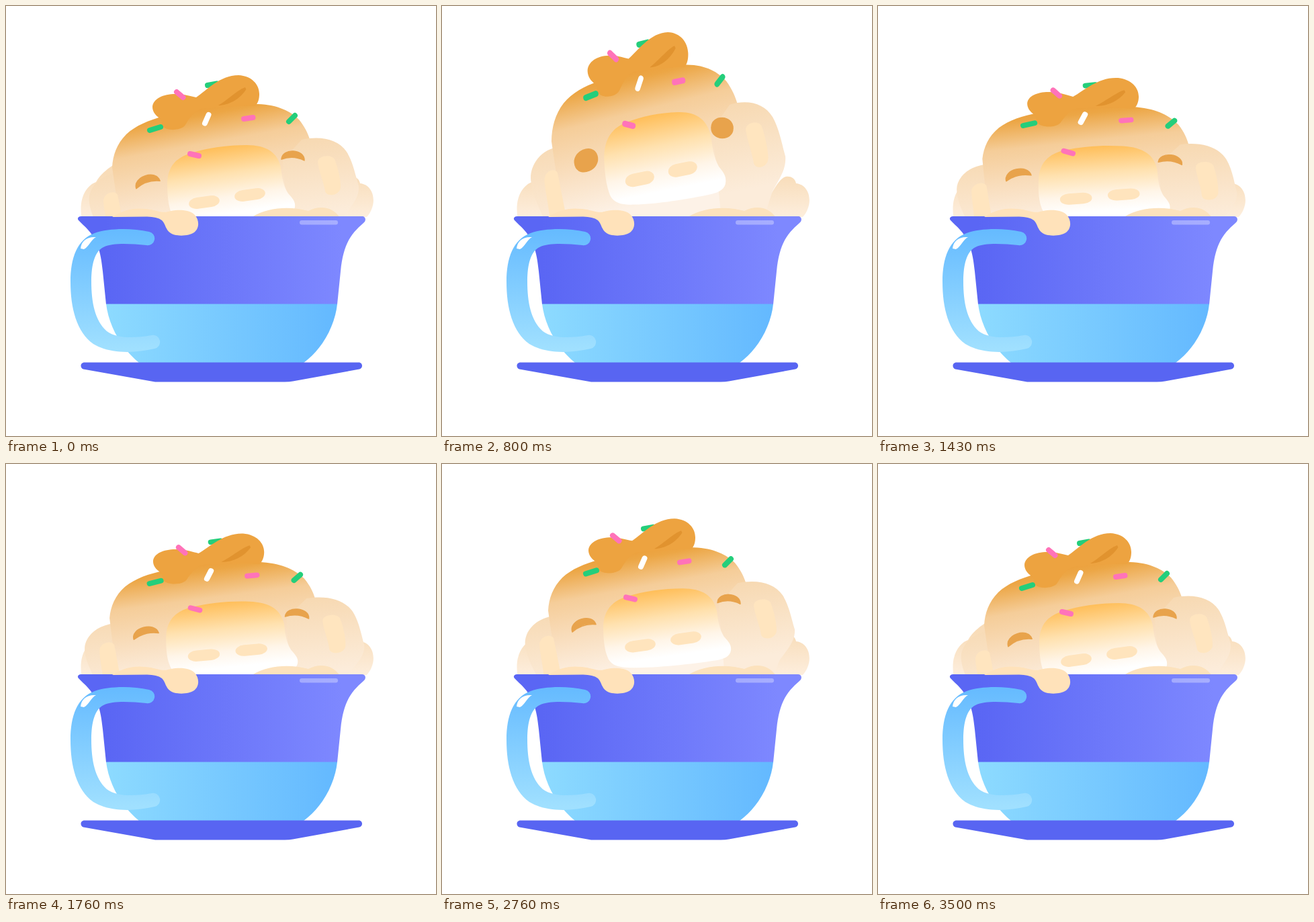
These frames come from a looping animation (640 by 640 pixels, 3530 ms). An HTML page:

```html
<!DOCTYPE html>
<html lang="en">
<head>
<meta charset="utf-8">
<title>Ice cream cup</title>
<style>
  html, body { margin: 0; width: 100%; height: 100%; overflow: hidden; background: #fff; }
  svg { display: block; width: 100vw; height: 100vh; }
  .sprinkle { stroke-width: 8; stroke-linecap: round; fill: none; }
  .green { stroke: #24ce7b; }
  .pink { stroke: #ff73b9; }
  .white { stroke: #fff; }
  .eye { fill: #e8a34c; stroke: #e8a34c; stroke-width: 1.5; stroke-linejoin: round; }
  .curl { fill: #eda340; }
  .patch { fill: #ffe5bf; }
  .saucer { fill: #5865f2; }
</style>
</head>
<body>
<svg viewBox="0 0 640 640">
  <defs>
    <linearGradient id="head" gradientUnits="userSpaceOnUse" x1="293" y1="150" x2="324" y2="322">
      <stop offset="0" stop-color="#eca03c"/>
      <stop offset=".07" stop-color="#eca645"/>
      <stop offset=".31" stop-color="#f5cd99"/>
      <stop offset=".65" stop-color="#f9dfc0"/>
      <stop offset="1" stop-color="#fdf2e7"/>
    </linearGradient>
    <linearGradient id="ear" gradientUnits="userSpaceOnUse" x1="300" y1="200" x2="318" y2="330">
      <stop offset="0" stop-color="#f6d6ac"/>
      <stop offset="1" stop-color="#fcecda"/>
    </linearGradient>
    <linearGradient id="bump" gradientUnits="userSpaceOnUse" x1="0" y1="250" x2="0" y2="314">
      <stop offset="0" stop-color="#f8dcb8"/>
      <stop offset="1" stop-color="#fdeedd"/>
    </linearGradient>
    <linearGradient id="snout" gradientUnits="userSpaceOnUse" x1="322" y1="210" x2="336" y2="308">
      <stop offset="0" stop-color="#ffbf5b"/>
      <stop offset=".4" stop-color="#ffe1ae"/>
      <stop offset=".75" stop-color="#fff5e8"/>
      <stop offset="1" stop-color="#fff"/>
    </linearGradient>
    <linearGradient id="cup" gradientUnits="userSpaceOnUse" x1="150" y1="0" x2="500" y2="0">
      <stop offset="0" stop-color="#5a66f4"/>
      <stop offset="1" stop-color="#7e88ff"/>
    </linearGradient>
    <linearGradient id="base" gradientUnits="userSpaceOnUse" x1="155" y1="0" x2="490" y2="0">
      <stop offset="0" stop-color="#8cdaff"/>
      <stop offset="1" stop-color="#64b9ff"/>
    </linearGradient>
    <linearGradient id="handle" gradientUnits="userSpaceOnUse" x1="0" y1="335" x2="0" y2="510">
      <stop offset="0" stop-color="#66bbff"/>
      <stop offset="1" stop-color="#a0e0ff"/>
    </linearGradient>
    <clipPath id="above"><rect width="640" height="314"/></clipPath>
  </defs>

  <g clip-path="url(#above)">
    <g fill="url(#bump)">
      <path d="M113 318C107 286 120 267 134 262C140 251 150 243 162 235L210 318Z"/>
      <path d="M468 318C485 290 500 256 512 254C521 253 526 258 527 264C548 266 554 295 537 314Z"/>
    </g>
    <g id="creature">
      <path fill="url(#ear)" d="M172 247C136 250 121 275 124 292C125 305 132 320 145 345L210 390V247Z"/>
      <path fill="url(#head)" d="M158 240C159 222 165 205 179 191C193 178 212 170 235 164C265 149 320 143 375 146C405 147 424 157 436 169C445 180 449 189 452 198L470 395H180Z"/>
      <path fill="url(#ear)" d="M440 199C468 193 494 198 507 217C517 233 520 252 525 268C526 285 515 296 503 313L470 390H425L412 230Z"/>
      <path class="patch" d="M145 291C145 277 163 274 166 281C170 300 175 325 180 350V385H156L153 350C151 325 146 305 145 291Z"/>
      <path class="patch" d="M464 233C463 222 485 220 489 228C494 240 498 258 498 269C498 282 478 285 475 276C473 262 466 247 464 233Z"/>
      <path fill="url(#snout)" d="M240 263C241 240 252 226 275 219C300 211 330 207 358 207C388 207 404 218 409 240C411 256 413 268 420 279C427 287 431 291 430 299C429 308 420 312 408 314C370 320 320 325 285 325C262 325 250 321 246 308C241 295 240 278 240 263Z"/>
      <g fill="#ffe4bd">
        <rect x="272" y="283.5" width="46" height="17" rx="13" ry="8.5" transform="rotate(-8 295 292)"/>
        <rect x="340" y="272.5" width="46" height="17" rx="13" ry="8.5" transform="rotate(-8 363 281)"/>
      </g>
      <path class="eye" id="left" transform="translate(211.5 266) rotate(-18)"/>
      <path class="eye" id="right" transform="translate(427 229) rotate(3)"/>
      <path class="sprinkle green" d="M300 118L314 115.5"/>
      <path class="curl" d="M218 150C219 138 234 131 252 131C265 131 274 134 283 136C298 126 318 103 346 103C366 104 377 117 377 131C377 139 375 144 371 149C345 148 310 152 290 153C279 157 273 167 267 177C261 186 237 187 232 177C233 171 230 168 226 165C221 161 218 156 218 150Z"/>
      <path fill="#e1932f" d="M356 121C346 124 331 139 316 148C331 148 348 139 357.5 124Z"/>
      <path class="sprinkle pink" d="M254 128L263.5 136"/>
      <path class="sprinkle green" d="M214 185L230 180"/>
      <path class="sprinkle white" d="M301.5 162L296 174.5"/>
      <path class="sprinkle pink" d="M354 168L367.5 166"/>
      <path class="sprinkle green" d="M421 172L430 163"/>
      <path class="sprinkle pink" d="M274 220L287 223"/>
    </g>
    <path fill="#fce2bd" d="M362 317C385 300 420 297 450 305C465 297 487 297 498 317Z"/>
  </g>

  <path fill="url(#cup)" d="M112 313H530C535 313 537 319 532 323C515 338 502 352 498 395L493 444H149L144 395C141 365 136 345 115 326L109 320C105 317 107 313 112 313Z"/>
  <path fill="url(#base)" d="M149 443.5H493C490 473 473 509 443 531H198C170 508 153 475 149 443.5Z"/>
  <path class="saucer" d="M117 530.5H525C531 530.5 532 539 526 540.5L427 558.5Q422 559.5 415 559.5H222L115 540.5C110 539 110 530.5 117 530.5Z"/>
  <rect x="437" y="319" width="57" height="6.5" rx="3.25" fill="#fff" fill-opacity=".32"/>
  <path fill="#ffe2ba" d="M158 314C175 303 190 300 208 302C222 303 232 309 241 306C256 302 274 303 281 311C288 319 288 331 280 337C272 343 252 343 245 338C237 333 238 325 232 319C227 315 220 314 210 313.5Z"/>
  <path fill="url(#handle)" d="M213 336C185 330 152 331 132 338C106 347 96 375 96 410C96 450 105 485 130 503C155 518 190 517 221 510A10 10 0 0 0 217 490C195 494 165 496 150 484C132 468 127 440 127 410C127 385 132 365 145 359C160 352 185 354 209 356A10 10 0 0 0 213 336Z"/>
  <path fill="#fff" d="M111 361C112 350 120 343 134 344C127 347 123 359 116 362Z"/>
</svg>

<script>
const LOOP = 3530;
const creature = document.getElementById("creature");
const eyes = { left: [18.5, 14], right: [17, 13] };   // half width, half height

const ease = (t, from, to) => {
  const u = Math.min(1, Math.max(0, (t - from) / (to - from)));
  return (1 - Math.cos(Math.PI * u)) / 2;
};
// swells from 0 to 1 between a and b, fades between c and d
const swell = (t, a, b, c, d) => ease(t, a, b) - ease(t, c, d);

// an eye is a domed upper lid over a lower lid that drops as it opens
function eyePath([w, h], open) {
  const k = h * 4 / 3, x = w * (.3 + .7 * open), y = k * (1.3 * open - .3);
  return `M${-w} 0C${-w} ${-k} ${w} ${-k} ${w} 0C${x} ${y} ${-x} ${y} ${-w} 0Z`;
}

function draw(t) {
  const jump = swell(t, 0, 620, 640, 1430);
  const tilt = swell(t, 800, 1120, 1120, 2400);
  const squash = swell(t, 900, 1500, 1600, 2600);
  const bob = swell(t, 1430, 2550, 2550, 3500);

  const x = 5 * (tilt - jump);
  const y = 4 * squash - 51 * jump - 6 * tilt - 24.5 * bob;
  const width = 1 - .06 * jump + .038 * squash;
  const height = 1 + .165 * jump - .033 * squash;
  const skewX = .038 * jump - .06 * tilt;
  const skewY = .075 * tilt - .03 * jump;
  creature.setAttribute("transform", `translate(${320 + x} ${220 + y})
    matrix(${width} ${skewY} ${skewX} ${height} 0 0) translate(-320 -220)`);

  const open = Math.min(1, jump * 1.15);
  for (const id in eyes)
    document.getElementById(id).setAttribute("d", eyePath(eyes[id], open));
}

const start = performance.now();
function tick() {
  draw((performance.now() - start) % LOOP);
  requestAnimationFrame(tick);
}
tick();
</script>
</body>
</html>
```
